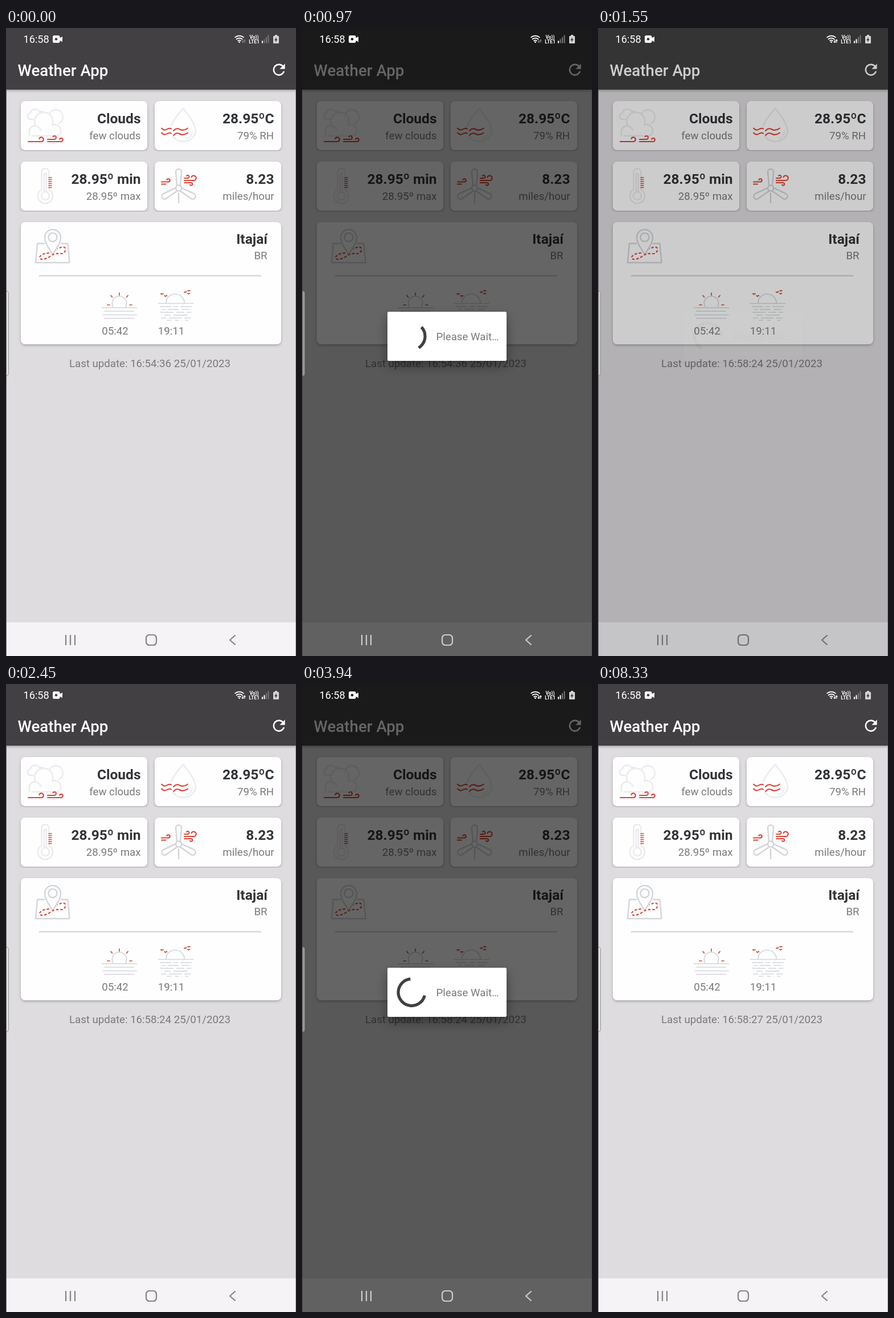
Recreate the animation shown at these times as an HTML page. Size 509 px wide and 1100 px high, loop 8.58 s.

```html
<!DOCTYPE html>
<html lang="en">
<head>
<meta charset="utf-8">
<title>Weather App</title>
<style>
  html, body { margin: 0; width: 100%; height: 100%; overflow: hidden; background: #dedcdf; }
  svg { display: block; width: 100%; height: 100%; font-family: Roboto, "Open Sans", sans-serif; }
  .line { fill: none; stroke-linecap: round; stroke-linejoin: round; }
  .butt { fill: none; stroke-linecap: butt; stroke-linejoin: round; }
  .pale { stroke: #ebebef; stroke-width: 2.4; }
  .gray { stroke: #d2d6d9; stroke-width: 2.4; }
  .red { stroke: #dc4437; stroke-width: 2.1; }
  .thin { stroke-width: 1.7; }
  .big { font-size: 24.5px; font-weight: 700; fill: #323438; }
  .small { font-size: 18.67px; fill: #7b797c; }
  .end { text-anchor: end; }
  .card { fill: #fefefe; filter: url(#soft); }
</style>
</head>
<body>
<svg viewBox="0 0 509 1100" preserveAspectRatio="none">
  <defs>
    <filter id="soft" x="-10%" y="-20%" width="120%" height="150%">
      <feDropShadow dx="0" dy="2" stdDeviation="2" flood-color="#000" flood-opacity=".26"/>
    </filter>
    <filter id="deep" x="-30%" y="-50%" width="160%" height="220%">
      <feDropShadow dx="0" dy="9" stdDeviation="10" flood-color="#000" flood-opacity=".38"/>
    </filter>
    <clipPath id="row"><rect y="120" width="509" height="95.5"/></clipPath>
  </defs>

  <rect width="509" height="1100" fill="#dedcdf"/>
  <rect width="509" height="108" fill="#423f42" filter="url(#soft)"/>
  <text x="20.5" y="84" font-size="27.7" font-weight="500" fill="#fff">Weather App</text>
  <path transform="translate(463.2 57.3) scale(1.32)" fill="#fff"
    d="M17.65 6.35A7.96 7.96 0 0 0 12 4a8 8 0 1 0 7.73 10h-2.08A6 6 0 1 1 12 6c1.66 0 3.14.69 4.22 1.78L13 11h7V4z"/>

  <g id="pair" clip-path="url(#row)">
    <rect class="card" x="26" y="128" width="222" height="86" rx="8"/>
    <rect class="card" x="261" y="128" width="222" height="86" rx="8"/>
  </g>
  <use href="#pair" y="106"/>
  <rect class="card" x="26" y="340" width="457" height="214" rx="8"/>

  <g class="end">
    <text class="big" x="236.5" y="167.3">Clouds</text>
    <text class="small" x="236.5" y="194.5">few clouds</text>
    <text class="big" x="470.5" y="167.3">28.95ºC</text>
    <text class="small" x="470" y="194.5">79% RH</text>
    <text class="big" x="236.5" y="273.3">28.95º min</text>
    <text class="small" x="236.5" y="300.5">28.95º max</text>
    <text class="big" x="470.5" y="273.3">8.23</text>
    <text class="small" x="470.5" y="300.5">miles/hour</text>
    <text class="big" x="459" y="377.5">Itajaí</text>
    <text class="small" x="458.5" y="404.5">BR</text>
  </g>
  <text class="small" x="168.3" y="537">05:42</text>
  <text class="small" x="266.7" y="537">19:11</text>
  <text class="small" id="stamp" x="252.5" y="594" text-anchor="middle"></text>

  <!-- clouds -->
  <g class="line pale">
    <path d="M48 160H44A5.5 5.5 0 0 1 43 149A8.5 8.5 0 0 1 59 147A5 5 0 0 1 66 148"/>
    <path d="M77 149A12.5 12.5 0 1 1 93 167"/>
    <path d="M41 189V182A11 11 0 0 1 52 171A16 16 0 1 1 81 170A10.5 10.5 0 1 1 90 189H46"/>
    <path d="M50 172a10 10 0 0 1 11 7"/>
  </g>
  <path class="line red" d="M39 199H62a3.8 3.8 0 1 0-3.6-5M73 199H97a3 3 0 1 0-3-4.2M73 195H85a3 3 0 1 0-2.5-4.6"/>

  <!-- humidity -->
  <path class="line pale" d="M290 172C293 161 303 150 311 141C319 151 333 168 333 181A22 20 0 0 1 293 190"/>
  <path class="line pale thin" d="M327 181a16 15 0 0 1-10 13"/>
  <g class="line red">
    <path id="wave" d="M273 175.500q4.500 5 9 2t8-1M294 180q5-6 11-2.500t14-2"/>
    <use href="#wave" y="8"/>
  </g>

  <!-- thermometer -->
  <g class="line pale">
    <path d="M62.500 283V252.500a6.500 6.500 0 0 1 13 0V283a13 13 0 1 1-13 0z"/>
    <path d="M67 287V257a2 2 0 0 1 4 0V287"/>
    <circle cx="69" cy="294" r="7"/>
  </g>
  <path class="butt red thin" id="ticks"/>

  <!-- turbine -->
  <g class="line gray">
    <path id="blade" d="M300 276L298 252a5 5 0 0 1 10 0L306 276"/>
    <use href="#blade" transform="rotate(120 303 280.5)"/>
    <use href="#blade" transform="rotate(240 303 280.5)"/>
    <circle cx="303" cy="280.5" r="5"/>
    <path d="M303 289V306"/>
  </g>
  <path class="line red" d="M273 269.500H285a2.700 2.700 0 1 0-2.600-3.600M273 273.500H280M313 267H329.500a4.200 4.200 0 1 0-4-5.500M313 263H319a2.500 2.500 0 1 0-2-4M313 271H325a2.300 2.300 0 1 1-2 3.500"/>

  <!-- map -->
  <g class="line gray">
    <path d="M67 377.500H55L52 411H111.500L108.500 377.500H97"/>
    <path d="M82 397C76 386 68 377 68 367a14 14 0 0 1 28 0C96 377 88 386 82 397z"/>
    <circle cx="82" cy="366.5" r="7.5"/>
  </g>
  <path class="butt red" stroke-dasharray="4.5 3" d="M76 394C66 394 58 399 59 403C62 408 72 404 79 399C87 393 93 396 99 395C105 393 106 385 102 384Q97 383 90 387"/>
  <path d="M58 434H448" stroke="#d7d6d9" stroke-width="2.3"/>

  <!-- sunrise -->
  <path class="line gray thin" d="M188 488a12.500 12.500 0 1 1 22 0M168.500 490H229.500M173 496H224M170 502.500H229M173 508.500H225"/>
  <path class="line red thin" d="M199 464v4M184 468.500l2.500 3M214 468.500l-2.500 3M178 485h4M217 485h4"/>

  <!-- sunset -->
  <path class="line gray thin" d="M281 481a16 15 0 0 1 32 0M267.500 482.500H328.500"/>
  <path class="butt gray thin" d="M270 488H290M294 488H302M306 488H326M274 493H280M284 493H303M308 493H322M271 498H294M299 498H313M317 498H325M278 503H289M294 503H319M272 508H281M286 508H308M313 508H324M282 512H290M297 512H303M315 512H320"/>
  <path class="line red thin" d="M271.500 465.500q1.500-.5 2 1.500q1-2.500 2.500-1.500M278 469q1.500-.5 2 1.500q1-2.500 2.500-1.500M312.500 462.500q1.500-.5 2 1q1-2 2.500-1.500M319 460q1.500-.5 2 1q.5-1.500 2-1M319 465q1-.5 1.500 1q.5-1.500 2-1"/>

  <rect y="1041" width="509" height="59" fill="#f5f3f6"/>
  <rect id="dim" width="509" height="1100" fill="#000"/>

  <g id="nav" class="butt" stroke-width="2.2">
    <path d="M105 1063V1081M113 1063V1081M121 1063V1081"/>
    <rect x="246" y="1063" width="18" height="18" rx="5.5"/>
    <path d="M402.500 1063.500L393 1072L402.500 1080.500"/>
  </g>

  <g id="dialog">
    <rect x="150" y="497" width="209" height="86" rx="2.5" fill="#fff" filter="url(#deep)"/>
    <circle id="arc" cx="192.5" cy="540" r="23.5" pathLength="360" fill="none" stroke="#423f42" stroke-width="5.2"/>
    <text class="small" x="235.5" y="547">Please Wait…</text>
  </g>

  <!-- status bar -->
  <g fill="#fff">
    <text x="30.5" y="25.7" font-size="18.2">16:58</text>
    <path fill-rule="evenodd" d="M84.500 13H92a2.500 2.500 0 0 1 2.500 2.500V17.500L99 15V24.500L94.500 22V23.500a2.500 2.500 0 0 1-2.500 2.500H84.500a2.500 2.500 0 0 1-2.500-2.500V15.500A2.500 2.500 0 0 1 84.500 13zM88 17.200a2.300 2.300 0 1 0 .01 0z"/>
    <path class="line" stroke="#fff" stroke-width="1.7" d="M402 16.500a11 11 0 0 1 15 0M404.500 19.500a7.500 7.500 0 0 1 10 0M407 22.300a4 4 0 0 1 5 0"/>
    <circle cx="409.5" cy="24.7" r="1.4"/>
    <path id="traffic" class="line" stroke-width="1.2" d="M415.500 20.500v5m-1.500-1.500l1.500 1.500l1.500-1.500M418.800 25.500v-5m-1.300 1.500l1.300-1.500l1.300 1.500"/>
    <g font-size="8.5" font-weight="700" text-anchor="middle">
      <text x="435.5" y="18.5">Vo))</text>
      <text x="435.5" y="26.8">LTE1</text>
    </g>
    <rect x="449" y="22.5" width="2" height="4"/>
    <rect id="bar" x="452.5" y="19.5" width="2" height="7"/>
    <path fill="#777477" d="M456 16h2v10.500h-2zM459.500 12.500h2v14h-2z"/>
    <path fill="#d8d6d8" d="M472 12h4v2h2a1 1 0 0 1 1 1v11a1 1 0 0 1-1 1h-8a1 1 0 0 1-1-1V15a1 1 0 0 1 1-1h2z"/>
    <path fill="#39363a" d="M475 15.500l-4 6h2.500l-.8 4l4-6h-2.500z"/>
  </g>

  <path id="handle" d="M0 461H1.500Q4.500 461 4.500 465V605Q4.500 609 1.500 609H0" stroke-width="1"/>
  <path d="M.5 108V1100" stroke="#3a383b" stroke-opacity=".75"/>
  <path d="M508.500 108V1100" stroke="#3a383b" stroke-opacity=".4"/>
</svg>
<script>
const LOOP = 8580;
const SECOND = 2720; // delay between the two refreshes
const $ = id => document.getElementById(id);
const clamp = x => Math.min(1, Math.max(0, x));
const ramp = (t, from, to) => clamp((t - from) / (to - from));
const easeOut = x => 1 - (1 - x) * (1 - x);
const mix = (a, b, u) => Math.round(a + (b - a) * u);
const gray = v => `rgb(${v},${v},${v})`;

$('ticks').setAttribute('d',
  Array.from({ length: 6 }, (_, i) => `M74.5 ${262 + i * 3.5}h6`).join(''));

// Half-cycle trim easing: cubic from (0,0) to (.5,1)
function trim(x) {
  let lo = 0, hi = 1;
  for (let i = 0; i < 24; i++) {
    const s = (lo + hi) / 2, r = 1 - s;
    if (.6 * r * r * s + .3 * r * s * s + .5 * s * s * s < x) lo = s; else hi = s;
  }
  return lo * lo * (3 - 2 * lo);
}

function spin(t) {
  const p = (t % 1333) / 1333;
  const head = trim(Math.min(p, .5));
  const tail = trim(Math.max(p - .5, 0));
  const angle = -90 + 90 * p + 720 * t / 4444 + 270 * tail;
  $('arc').setAttribute('stroke-dasharray', `${Math.max(.1, 270 * (head - tail))} 360`);
  $('arc').setAttribute('transform', `rotate(${angle} 192.5 540)`);
}

function draw(t) {
  const local = t < 3000 ? t : t - SECOND;
  const dim = ramp(local, 780, 960) * (1 - ramp(local, 1430, 1610));
  const enter = easeOut(ramp(local, 780, 940));
  const show = enter * (1 - ramp(local, 1400, 1555));
  const size = .9 + .1 * enter;

  $('dim').setAttribute('opacity', .6 * dim);
  $('dialog').setAttribute('opacity', show);
  $('dialog').setAttribute('transform',
    `translate(254.5 540) scale(${size}) translate(-254.5 -540)`);
  spin(Math.max(0, local - 768));

  const lit = ramp(dim, .4, .8);
  $('nav').setAttribute('stroke', gray(mix(mix(132, 100, clamp(dim * 2)), 205, lit)));
  $('handle').setAttribute('fill', gray(mix(228, 152, dim)));
  $('handle').setAttribute('stroke', gray(mix(150, 140, dim)));

  const busy = t >= 1000;
  $('traffic').setAttribute('stroke', busy ? '#fff' : '#7d7a7d');
  $('bar').setAttribute('fill', busy ? '#fff' : '#777477');

  const clock = t < 1430 ? '16:54:36' : t < 1430 + SECOND ? '16:58:24' : '16:58:27';
  const label = `Last update: ${clock} 25/01/2023`;
  if ($('stamp').textContent !== label) $('stamp').textContent = label;
}

const begin = performance.now();
function tick() {
  draw((performance.now() - begin) % LOOP);
  requestAnimationFrame(tick);
}
tick();
</script>
</body>
</html>
```
